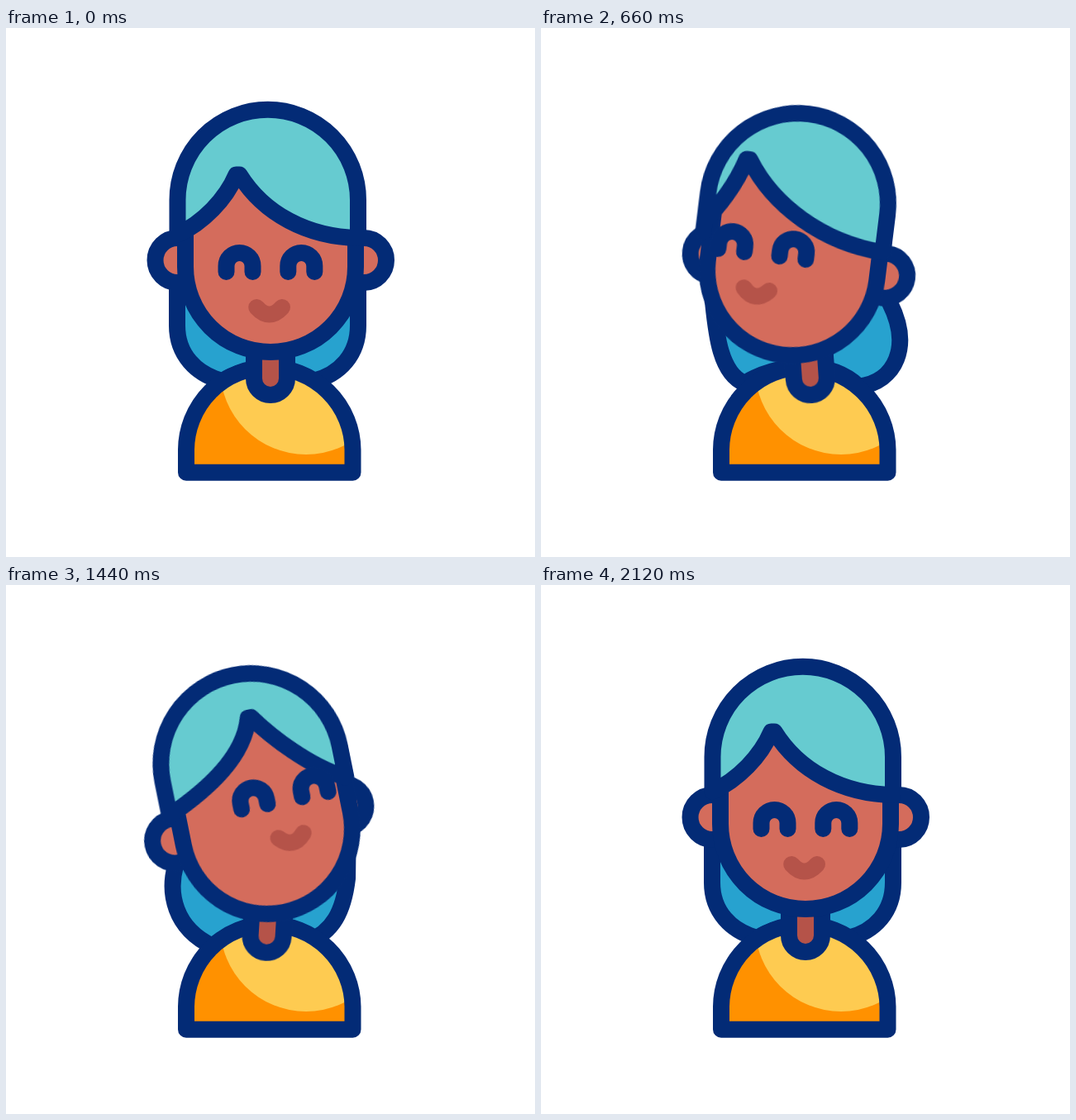
Recreate the animation shown at these times as an HTML page without scripts. Size 640 px wide and 640 px high, loop 2400 ms.

```html
<!DOCTYPE html>
<html lang="en">
<head>
<meta charset="utf-8">
<title>Woman turning her head</title>
<style>
html, body { margin: 0; width: 100%; height: 100%; overflow: hidden; background: #fff; }
svg { display: block; width: 100vw; height: 100vh; }

.line { stroke: #032b76; stroke-width: 20; stroke-linejoin: round; stroke-linecap: round; }
.skin { fill: #d46c5c; }
.shade { fill: #b55349; }
.none { fill: none; }

/* every part shares one clock: rest, look left, look right, rest */
.move {
  animation: 2400ms cubic-bezier(.7, 0, .3, 1) infinite;
  transform-box: view-box;
}
.head { animation-name: head; transform-origin: 320px 289px; }
.neck { animation-name: neck; transform-origin: 320px 424px; }
.face { animation-name: face; }
.ear-l { animation-name: ear-l; }
.ear-r { animation-name: ear-r; }
.back { animation-name: back; }
.fringe { animation-name: fringe; }

@keyframes head {
  0%, 88.333%, 100% { transform: translate(0px, 0px) rotate(0deg); }
  33.333% { transform: translate(-16.4px, 4.3px) rotate(7.2deg); }
  63% { transform: translate(-4px, 6px) rotate(-11.6deg); }
}
@keyframes neck {
  0%, 88.333%, 100% { transform: translate(0px, 0px) rotate(0deg); }
  33.333% { transform: translate(6px, 0px) rotate(-4deg); }
  63% { transform: translate(-4.5px, .8px) rotate(3.6deg); }
}
@keyframes face {
  0%, 88.333%, 100% { transform: translate(0px, 0px); }
  33.333% { transform: translate(-39.8px, -21.5px); }
  63% { transform: translate(28.5px, -35.4px); }
}
@keyframes ear-l {
  0%, 63%, 88.333%, 100% { transform: translate(0px, 0px); }
  33.333% { transform: translate(14.8px, 0px); }
}
@keyframes ear-r {
  0%, 88.333%, 100% { transform: translate(0px, 0px); }
  33.333% { transform: translate(-1px, .8px); }
  63% { transform: translate(-17px, -.5px); }
}
@keyframes back {
  0%, 88.333%, 100% {
    d: path("M207 280 L207 360 C207 395 230 419 262 427 C290 408 345 408 372 427 C404 419 426 395 426 360 L426 280 Z");
  }
  33.333% {
    d: path("M206 280 L208 330 C212 368 216 418 246 430 C285 405 350 400 385 434 C430 428 449 385 422 332 L416 290 Z");
  }
  63% {
    d: path("M206 305 L205 340 C196 372 203 415 250 437 C285 408 335 408 365 431 C395 420 408 395 413 355 L414 275 Z");
  }
}
@keyframes fringe {
  0%, 88.333%, 100% {
    d: path("M207.5 250 L207.5 208 A109.25 109.25 0 0 1 426 208 L426 254 C365 253 312 225 282.5 177.5 L278.5 177.5 C266 207 239 235 207.5 250 Z");
  }
  33.333% {
    d: path("M207.5 256 L207.5 208 A109.25 109.25 0 0 1 426 208 L426 254 C351 251 286 213 252 161.8 L248 161.8 C239 194 221 225 207.5 241 Z");
  }
  63% {
    d: path("M207.5 250 L207.5 208 A109.25 109.25 0 0 1 426 208 L426 247 C385 225 347 180 328.5 153 L324.5 153 C311 197 262 227 207.5 250 Z");
  }
}
</style>
</head>
<body>
<svg viewBox="0 0 640 640" xmlns="http://www.w3.org/2000/svg">
  <defs>
    <path id="top" d="M218 537.7 V511 A99.5 100.5 0 0 1 317.5 410.5 A102 100.5 0 0 1 419.5 511 V537.7 Z"/>
    <clipPath id="in-top"><use href="#top"/></clipPath>
    <path id="eye" d="M-16 7 V0 A16 16 0 0 1 16 0 V7"/>
  </defs>

  <path class="move back line" fill="#27a2cf"
    d="M207 280 L207 360 C207 395 230 419 262 427 C290 408 345 408 372 427 C404 419 426 395 426 360 L426 280 Z"/>

  <use href="#top" fill="#ff9100"/>
  <circle cx="363" cy="412" r="104" fill="#fecb51" clip-path="url(#in-top)"/>
  <use href="#top" class="line none"/>

  <path class="move neck line shade" d="M300 388 V424 A20 20 0 0 0 340 424 V388"/>

  <g class="move head">
    <circle class="move ear-l line skin" cx="207.5" cy="281" r="27"/>
    <circle class="move ear-r line skin" cx="433" cy="281" r="27"/>
    <path class="line skin" d="M217 200 V289 A103 103 0 0 0 423 289 V200 C423 110 217 110 217 200 Z"/>
    <path class="move fringe line" fill="#66cbd0"
      d="M207.5 250 L207.5 208 A109.25 109.25 0 0 1 426 208 L426 254 C365 253 312 225 282.5 177.5 L278.5 177.5 C266 207 239 235 207.5 250 Z"/>
    <g class="move face">
      <use href="#eye" class="line none" x="282.5" y="288"/>
      <use href="#eye" class="line none" x="357.3" y="288"/>
      <path class="none" stroke="#b55349" stroke-width="20" stroke-linecap="round" d="M303.2 338 Q318.6 355 334 338"/>
    </g>
  </g>
</svg>
</body>
</html>
```
